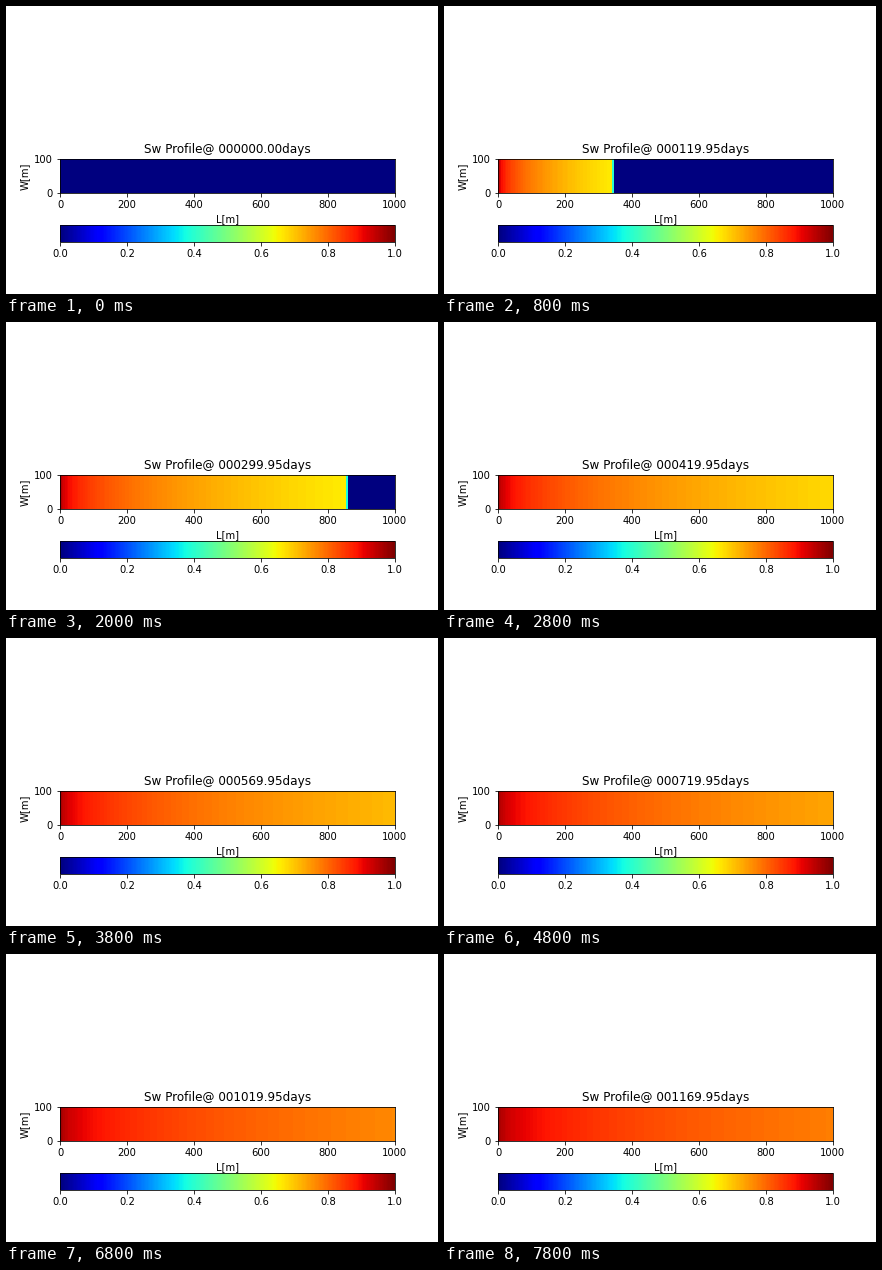
A matplotlib script for the animation above (8 s loop, 432 px wide and 288 px high).

```python
import numpy as np
import matplotlib.pyplot as plt
from matplotlib.animation import FuncAnimation

LENGTH, WIDTH = 1000, 100
CELLS = 200
FRAMES, INTERVAL = 40, 200
STEP_DAYS = 30
FRONT_SPEED = 2.86  # metres per day

dx = LENGTH / CELLS
x = (np.arange(CELLS) + 0.5) * dx


def days_at(i):
    return max(0.0, i * STEP_DAYS - 0.05)


def saturation(days):
    """Water saturation along the core: rarefaction behind a sharp front."""
    if days == 0:
        return np.zeros(CELLS)
    speed = x / days
    behind = np.clip((FRONT_SPEED * days - x) / dx + 0.5, 0, 1)
    return (1 - 0.237 * speed ** 0.35) * behind


def title_at(days):
    return f"Sw Profile@ {days:09.2f}days"


plt.rcParams["font.family"] = "DejaVu Sans"
fig, ax = plt.subplots(figsize=(6, 4), dpi=72)
fig.subplots_adjust(left=0.125, right=0.9, bottom=0.125, top=0.88)

image = ax.imshow(saturation(0)[None, :], cmap="jet", vmin=0, vmax=1,
                  extent=(0, LENGTH, 0, WIDTH), interpolation="nearest")
ax.set_xlabel("L[m]")
ax.set_ylabel("W[m]")
ax.set_yticks([0, WIDTH])
title = ax.set_title(title_at(0))
fig.colorbar(image, ax=ax, orientation="horizontal")


def update(i):
    days = days_at(i)
    image.set_data(saturation(days)[None, :])
    title.set_text(title_at(days))
    return image, title


anim = FuncAnimation(fig, update, frames=FRAMES, interval=INTERVAL,
                     repeat=True, repeat_delay=0)
plt.show()
```
